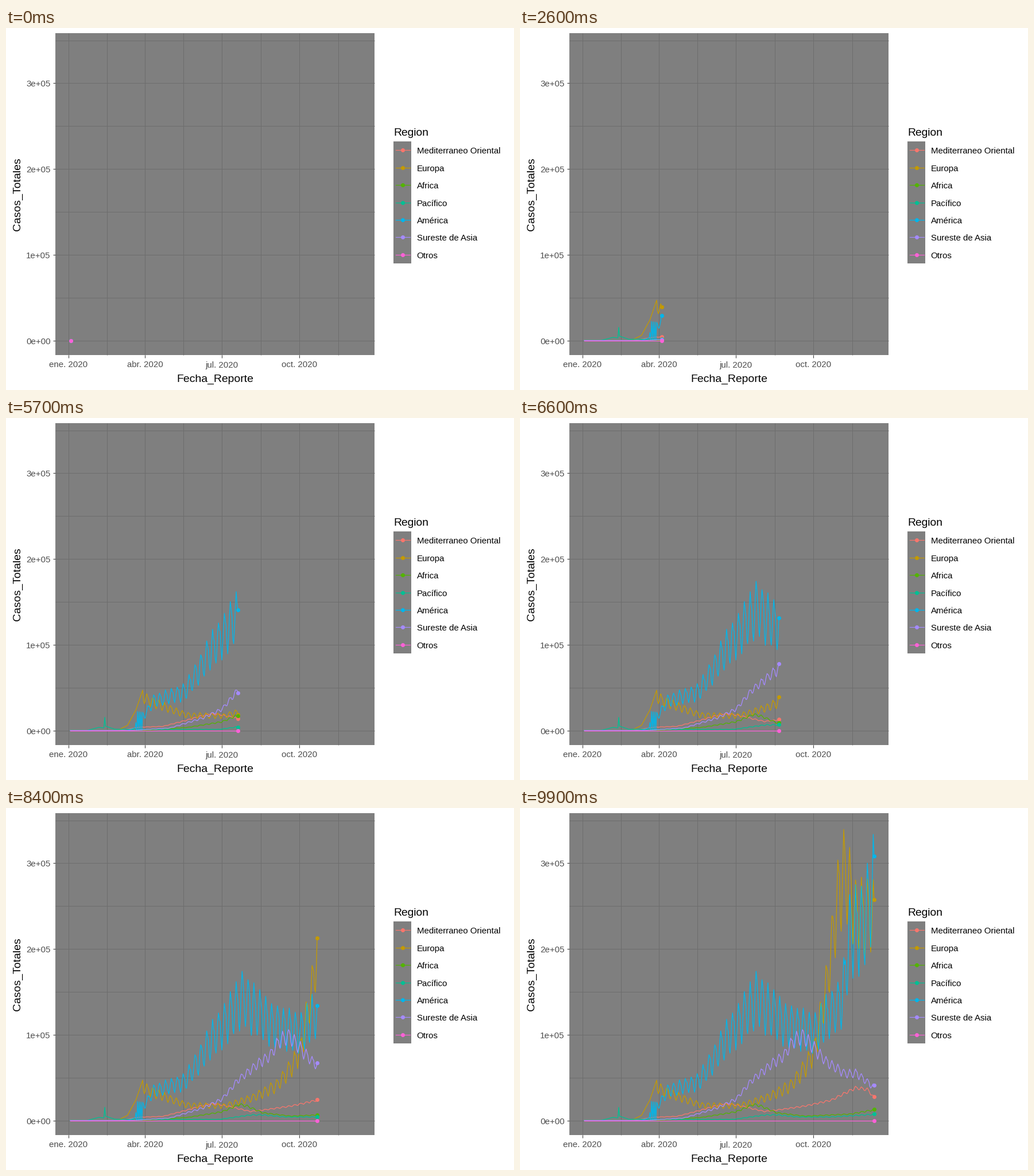
Recreate the animation shown at these times as a matplotlib script. Size 885 by 632 pixels, loop 10 s.

```python
import numpy as np
import matplotlib.pyplot as plt
from matplotlib.animation import FuncAnimation
from matplotlib.patches import Rectangle

W, H, DPI = 885, 632, 128
FRAMES, INTERVAL = 100, 100
FIRST, LAST = 2, 346          # days since 1 January
PX = 72 / DPI                 # one pixel in points

plt.rcParams["font.family"] = "Liberation Sans"

days = np.arange(FIRST, LAST + 1)
rng = np.random.default_rng(7)
WEEK = np.array([0, .3, .72, 1, .8, .66, .2])   # reporting level by weekday


def px_x(day):
    return 108.9 + 1.468 * np.asarray(day)


def px_y(thousands):
    return 545.5 - 1.497 * np.asarray(thousands)


def cases(dip, *keys, shift=1):
    """Trend through (day, thousands) keys with weekly dips below it."""
    top = np.interp(days, *zip(*keys))
    gap = 1 - WEEK[(days + shift) % 7] + rng.uniform(-.06, .06, days.size)
    return top * (1 - dip * gap * (days > 88))


mediterranean = cases(.1, (60, 0), (86, 4), (112, 5), (140, 12.5), (167, 20.5),
                      (180, 19.5), (216, 11), (236, 13.5), (264, 17.6),
                      (295, 24.8), (324, 40), (338, 38), (346, 28))
europe = cases(.31, (58, 0), (70, 6), (80, 24), (88, 47), (95, 41), (140, 21),
               (185, 20), (219, 31), (247, 48), (262, 69), (275, 95),
               (289, 178), (303, 306), (311, 341), (324, 285), (346, 280))
africa = cases(.15, (90, 0), (142, 3.9), (182, 10.8), (203, 20), (212, 18),
               (231, 9.5), (264, 5.4), (318, 8), (346, 13.4))
pacific = cases(.2, (22, 0), (36, 3.6), (42, 3), (43, 15.3), (44, 5), (55, 1.4),
                (180, 1.5), (216, 7), (230, 7.2), (256, 4.5), (295, 4.5),
                (346, 7.8))
# The weekly rhythm moves one day earlier in autumn
america = cases(.37, (70, 0), (79, 3), (82, 22), (90, 21), (101, 42), (138, 55),
                (171, 116), (206, 173), (240, 138), (275, 125), (308, 170),
                (318, 268), (332, 275), (345, 328), shift=days >= 285)
# Days without reports in late March
america[(days > 80) & (days < 88) & (days % 2 == 1)] = 0
asia = cases(.17, (75, 0), (120, 3), (160, 16), (182, 27), (201, 51), (226, 73),
             (240, 83), (250, 102), (262, 107), (289, 75), (312, 59), (325, 60),
             (346, 42))

REGIONS = [
    ("Mediterraneo Oriental", "#F8766D", mediterranean),
    ("Europa", "#C49A00", europe),
    ("Africa", "#53B400", africa),
    ("Pacífico", "#00C094", pacific),
    ("América", "#00B6EB", america),
    ("Sureste de Asia", "#A58AFF", asia),
    ("Otros", "#FB61D7", 0 * days),
]

fig = plt.figure(figsize=(W / DPI, H / DPI), dpi=DPI, facecolor="white")
ax = fig.add_axes([0, 0, 1, 1])
ax.set_xlim(0, W)
ax.set_ylim(H, 0)
ax.axis("off")

LEFT, RIGHT, TOP, BOTTOM = 86, 642, 9, 571


def rect(x0, y0, x1, y1):
    ax.add_patch(Rectangle((x0, y0), x1 - x0, y1 - y0, fc="#7F7F7F", lw=0))


def rule(xs, ys, color):
    ax.plot(xs, ys, color=color, lw=PX, zorder=1.5, solid_capstyle="butt")


def label(x, y, text, size=15, color="black", **kw):
    ax.text(x, y, text, fontsize=size * PX, color=color, va="baseline", **kw)


def dot(x, y, color):
    return ax.plot(x, y, "o", ms=7 * PX, mew=0, color=color, zorder=4)[0]


# Panel, grid and axes
rect(LEFT, TOP, RIGHT, BOTTOM)
for day in (0, 45.5, 91, 136.5, 182, 228, 274, 320):
    rule([px_x(day)] * 2, [TOP, BOTTOM], "#6D6D6D")
for value in range(0, 351, 50):
    rule([LEFT, RIGHT], [px_y(value)] * 2, "#6D6D6D")

for day, month in ((0, "ene."), (91, "abr."), (182, "jul."), (274, "oct.")):
    rule([px_x(day)] * 2, [BOTTOM, BOTTOM + 5], "#333333")
    label(px_x(day), 592.5, f"{month} 2020", color="#4D4D4D", ha="center")
for n in range(4):
    y = px_y(100 * n)
    rule([LEFT - 4.5, LEFT], [y, y], "#333333")
    label(77.5, y + 6, f"{n}e+05" if n else "0e+00", color="#4D4D4D", ha="right")

label(364, 618, "Fecha_Reporte", 19.4, ha="center")
label(25, 289.8, "Casos_Totales", 19.4, ha="center", rotation=90,
      rotation_mode="anchor")

# Legend
label(675.5, 187.5, "Region", 19.2)
rect(675, 198, 706, 411)
for i, (name, color, _) in enumerate(REGIONS):
    y = 213.4 + 30.4 * i
    ax.plot([679, 703.5], [y, y], color=color, lw=1.2 * PX, zorder=3)
    dot([690.8], [y], color)
    label(715.5, y + 6, name)

# Moving parts
xs = px_x(days)
tracks = []
for _, color, values in REGIONS:
    line, = ax.plot([], [], color=color, lw=1.3 * PX, zorder=3,
                    solid_joinstyle="round")
    tracks.append((line, dot([], [], color), px_y(values)))


def draw(frame):
    # Reveal every day that rounds to this frame or an earlier one
    last = min(int((frame + .5) * (LAST - FIRST) / (FRAMES - 1)), LAST - FIRST)
    for line, head, ys in tracks:
        line.set_data(xs[:last + 1], ys[:last + 1])
        head.set_data([xs[last]], [ys[last]])
    return [artist for track in tracks for artist in track[:2]]


anim = FuncAnimation(fig, draw, frames=FRAMES, interval=INTERVAL,
                     repeat=True, repeat_delay=0, blit=False)
plt.show()
```
